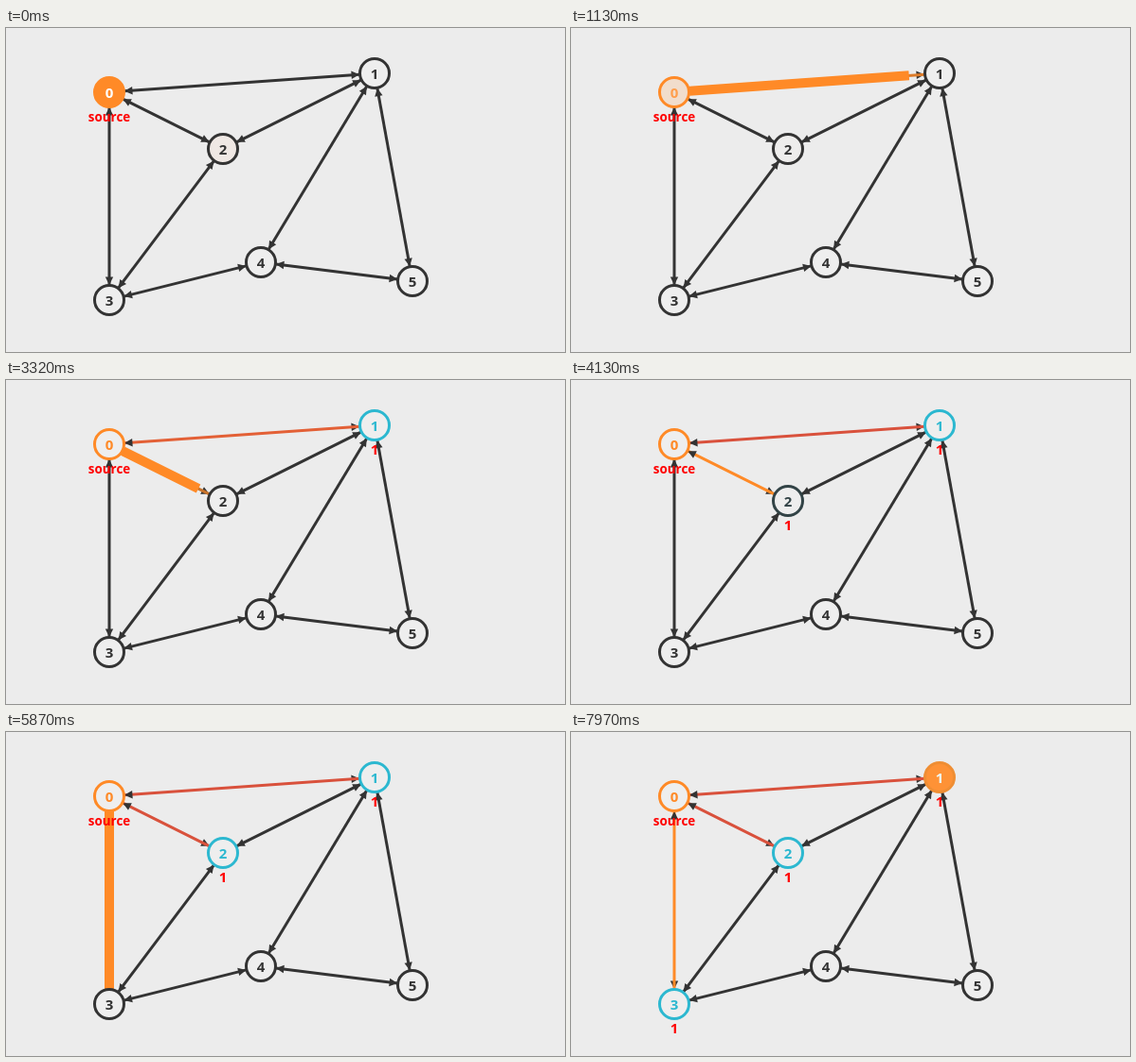
An HTML page with a canvas that plays this animation: 590 px wide and 343 px high, repeating every 8000 ms.

```html
<!DOCTYPE html>
<html lang="en">
<head>
<meta charset="utf-8">
<title>Breadth-first search</title>
<style>
  html, body { margin: 0; width: 100%; height: 100%; overflow: hidden; background: #ececec; }
  canvas { display: block; width: 590px; height: 343px; }
</style>
</head>
<body>
<canvas id="stage"></canvas>
<script>
const W = 590, H = 343, LOOP = 8000;
const STEP = 1125, START = 415;   // one algorithm step, first step
const FADE = 1100, GROW = 960, THIN = 115;
const R = 16;

const DARK = [51, 51, 51], PALE = [238, 238, 238], WHITE = [255, 255, 255];
const ORANGE = [255, 138, 39], CYAN = [44, 184, 208], RED = [217, 81, 60];
const WARM = [239, 232, 228];

const nodes = [[109, 68], [389, 48], [229, 128], [109, 288], [269, 248], [429, 268]];
const edges = [[0, 1], [0, 2], [0, 3], [1, 2], [1, 4], [1, 5], [2, 3], [3, 4], [4, 5]];

const canvas = document.getElementById('stage');
const ctx = canvas.getContext('2d');
const dpr = window.devicePixelRatio || 1;
canvas.width = W * dpr;
canvas.height = H * dpr;
ctx.scale(dpr, dpr);

const stepAt = n => START + n * STEP;
const clamp = x => Math.max(0, Math.min(1, x));
const ease = x => x < 0.5 ? 4 * x ** 3 : 1 - 4 * (1 - x) ** 3;
const progress = (t, start, length) => ease(clamp((t - start) / length));
const mix = (a, b, k) => a.map((v, i) => v + (b[i] - v) * k);
const css = c => `rgb(${c.map(Math.round).join(',')})`;

function line(a, b, width, color) {
  ctx.beginPath();
  ctx.moveTo(...a);
  ctx.lineTo(...b);
  ctx.lineWidth = width;
  ctx.strokeStyle = css(color);
  ctx.stroke();
}

function arrow([x, y], ux, uy) {
  const bx = x + ux * 8.5, by = y + uy * 8.5;
  ctx.beginPath();
  ctx.moveTo(x, y);
  ctx.lineTo(bx - uy * 4.2, by + ux * 4.2);
  ctx.lineTo(bx + uy * 4.2, by - ux * 4.2);
  ctx.fillStyle = css(DARK);
  ctx.fill();
}

function text(str, x, y, size, color) {
  ctx.font = `bold ${size}px "Open Sans", "Noto Sans", sans-serif`;
  ctx.fillStyle = css(color);
  ctx.fillText(str, x, y);
}

// The first three edges are explored in turn, two steps apart.
function edgeColor(i, t) {
  if (i > 2) return DARK;
  const lit = mix(DARK, ORANGE, progress(t, stepAt(2 * i), FADE));
  return i < 2 ? mix(lit, RED, progress(t, stepAt(2 * i + 2), FADE)) : lit;
}

function drawEdge(i, t) {
  const [p, q] = edges[i].map(n => nodes[n]);
  const dx = q[0] - p[0], dy = q[1] - p[1], len = Math.hypot(dx, dy);
  const ux = dx / len, uy = dy / len;
  const at = d => [p[0] + ux * d, p[1] + uy * d];
  const a = at(R), b = at(len - R);

  arrow(b, -ux, -uy);
  line(a, b, 3, edgeColor(i, t));
  arrow(a, ux, uy);

  const age = t - stepAt(2 * i);
  if (i < 3 && age > 0 && age < GROW + THIN) {
    const tip = R + (len - 2 * R) * progress(age, 0, GROW);
    const width = 10 - 7 * clamp((age - GROW) / THIN);
    line(a, at(tip), width, ORANGE);
  }
}

function nodeLook(i, t) {
  let ring = DARK, fill = PALE, ink = DARK;
  if (i === 0) {
    const k = progress(t, START, FADE);
    return { ring: ORANGE, fill: mix(ORANGE, PALE, k), ink: mix(WHITE, ORANGE, k) };
  }
  if (i <= 3) ring = ink = mix(DARK, CYAN, progress(t, stepAt(2 * i - 1), FADE));
  if (i === 1) {
    const k = progress(t, stepAt(6), FADE);
    ring = mix(ring, ORANGE, k);
    fill = mix(PALE, ORANGE, k);
    ink = mix(ink, WHITE, k);
  }
  if (i === 2) fill = mix(WARM, PALE, progress(t, START, FADE));
  return { ring, fill, ink };
}

function drawNode(i, t) {
  const [x, y] = nodes[i];
  const { ring, fill, ink } = nodeLook(i, t);
  ctx.beginPath();
  ctx.arc(x, y, 15.5, 0, 2 * Math.PI);
  ctx.fillStyle = css(fill);
  ctx.fill();
  ctx.lineWidth = 3;
  ctx.strokeStyle = css(ring);
  ctx.stroke();
  text(i, x, y + 5.5, 15, ink);
}

function drawLabel(i, t) {
  const [x, y] = nodes[i], red = [255, 0, 0];
  if (i === 0) text('source', x, y + 31, 13.4, red);
  else if (i <= 3 && t >= stepAt(2 * i - 1)) text('1', x, y + 31, 15, red);
}

function draw(t) {
  ctx.fillStyle = '#ececec';
  ctx.fillRect(0, 0, W, H);
  ctx.textAlign = 'center';
  for (let i = edges.length - 1; i >= 0; i--) drawEdge(i, t);
  nodes.forEach((_, i) => drawNode(i, t));
  nodes.forEach((_, i) => drawLabel(i, t));
}

const begin = performance.now();
function tick() {
  draw((performance.now() - begin) % LOOP);
  requestAnimationFrame(tick);
}
tick();
</script>
</body>
</html>
```
